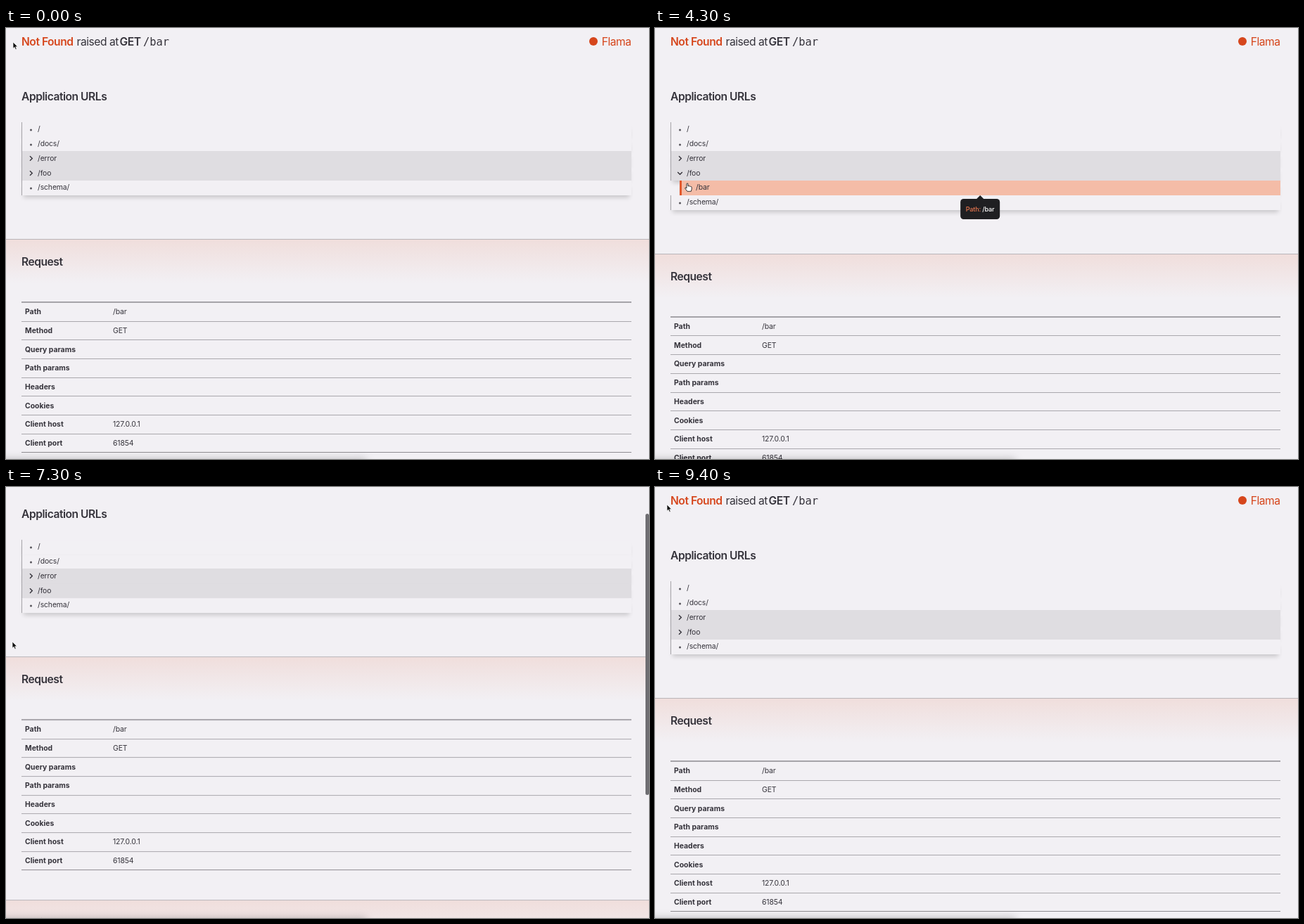
Write an HTML page that moves like this. It is 914 px wide and 613 px high and loops after 9500 ms.

```html
<!DOCTYPE html>
<html lang="en">
<head>
<meta charset="utf-8">
<title>Not Found</title>
<style>
  html, body { margin: 0; width: 100%; height: 100%; overflow: hidden; background: #f2f0f4; }
  body { position: relative; color: #35333b; font: 10.4px Inter, sans-serif; letter-spacing: -.01em; }
  #page { position: absolute; left: 0; top: 0; width: 914px; height: 944px; }
  header { position: relative; height: 133.8px; }
  header span, h2 { position: absolute; margin: 0; font-size: 15.6px; line-height: 20px; letter-spacing: -.03em; white-space: pre; }
  header span { top: 9.5px; }
  h2 { left: 22px; font-weight: 600; }
  header .strong { font-weight: 600; }
  .accent { color: #d6461c; }
  header .mono { font-family: "DejaVu Sans Mono", monospace; font-size: 15.4px; letter-spacing: 0; }
  .logo { position: absolute; left: 829px; top: 13px; width: 12px; height: 12px; border-radius: 50%; background: #d6461c; }

  #tree { margin: 0 25px 62.2px 22px; --drop: 0 6px 6px -3px rgba(0, 0, 0, .18); }
  .row { position: relative; height: 20.8px; box-sizing: border-box; border-left: 1px solid #a5a3a8;
    background: #f2f0f4; box-shadow: var(--drop); }
  .row span { position: absolute; left: 22px; top: .5px; line-height: 20.8px; }
  .row svg { position: absolute; left: 8px; top: 6px; width: 9px; height: 9px; }
  .row.branch { background: #dfdde1; }
  .row.open svg { transform: rotate(90deg); }
  .row.hover { background: #f4bca7; box-shadow: inset 2px 0 #e2582c, var(--drop); border-left-color: #e2582c; }

  section { position: relative; border-top: 1px solid #b9b5b9; padding-top: 89px; margin-bottom: 42px;
    background: linear-gradient(#f0dedc, #f2f0f4 62px); }
  section h2 { top: 22px; }
  .table { margin: 0 25px 0 22px; border-bottom: 1px solid #8f8d92; box-shadow: 0 -1px #a09ea3; }
  .line { display: flex; align-items: center; min-height: 26.7px; box-sizing: border-box; border-top: 1px solid #aaa8ad; }
  .line b { width: 130px; padding-left: 5px; box-sizing: border-box; letter-spacing: 0; }
  .line div { line-height: 15.6px; white-space: pre; }
  .line.tall { height: 105px; }

  #tip { position: absolute; padding: 8px 7.5px; border-radius: 4.5px; background: #1f1f22; color: #fff;
    font-size: 9.1px; font-weight: 500; line-height: 13px; letter-spacing: -.02em; white-space: pre; transform: translateX(-50%); }
  #tip::before { content: ""; position: absolute; left: 50%; top: -5px; margin-left: -5px;
    border: 5px solid transparent; border-top: 0; border-bottom-color: #1f1f22; }
  #tip i { font-style: normal; color: #e8764f; }

  #bar { position: absolute; right: 0; top: 0; width: 5px; height: 400px; border-radius: 3px; background: #6f6e72; }
  #shade { position: absolute; left: -40px; top: 616px; width: 550px; height: 40px; box-shadow: 0 0 12px 2px rgba(0, 0, 0, .28); }
  #cursor { position: absolute; left: 0; top: 0; width: 14px; height: 16px; overflow: visible; }
</style>
</head>
<body>
<div id="page">
  <header>
    <span class="accent strong" style="left:22px">Not Found</span>
    <span style="left:100.5px">raised at</span>
    <span class="strong" style="left:161.5px">GET</span>
    <span class="mono" style="left:195px">/bar</span>
    <div class="logo"></div>
    <span class="accent" style="right:25.5px">Flama</span>
    <h2 style="top:88px">Application URLs</h2>
  </header>
  <div id="tree"></div>
  <div id="tables"></div>
  <div id="tip"></div>
</div>
<div id="bar"></div>
<div id="shade"></div>
<svg id="cursor">
  <path id="arrow" d="M0 0V9.2L2.1 7.3L3.6 10.6L5.2 9.9L3.8 6.7H6.6Z" fill="#111" stroke="#fff" stroke-width=".7"/>
  <path id="hand" d="M0 .8Q1-.4 2 .8V4.2Q3.2 3.4 3.9 4.4Q5 3.7 5.7 4.8Q7.2 4.6 7.2 6V8.4L6.3 11.6H.9L-2.2 7.4Q-2.4 5.9-1 6.4L0 7.3Z" fill="#fff" stroke="#222" stroke-width=".9"/>
</svg>
<script>
const DURATION = 9500, STEP = 100, TREE_TOP = 133.8, ROW = 20.8, INDENT = 13;
const MAX_SCROLL = 331, GLIDE = 400;
const $ = id => document.getElementById(id);

const endpoint = (name, line, path) => ({
  Endpoint: name, File: 'examples/error.py', Line: line, Module: 'examples.error', Name: name, Path: path
});
const leaf = (label, under = [], info = { Path: label }) => ({ label, under, info });
const branch = (key, under) => ({ ...leaf('/' + key, under), key });
const rows = [
  leaf('/'),
  leaf('/docs/'),
  branch('error'),
  leaf('/500', ['error'], endpoint('error', 43, '/500')),
  branch('foo'),
  branch('bar', ['foo']),
  leaf('/barfoo/', ['foo', 'bar'], endpoint('barfoo', 53, '/barfoo/')),
  leaf('/foobar/', ['foo', 'bar'], endpoint('foobar', 58, '/foobar/')),
  leaf('/schema/')
];

const home = '/Users/damian-desk', lib = home + '/.pyenv/versions/3.10.4/lib/python3';
const tables = {
  Request: {
    Path: '/bar', Method: 'GET', 'Query params': '', 'Path params': '', Headers: '', Cookies: '',
    'Client host': '127.0.0.1', 'Client port': '61854'
  },
  Environment: {
    'Python version': '3.10.4 (main, Sep 21 2022, 18:58:02) [Clang 13.1.6 (clang-1316.0.21.2.5)]',
    Python: home + '/Dev/vortice/.venv/bin/python',
    Platform: 'darwin',
    Path: [home + '/Dev/vortice/flama', home + '/Dev/vortice/.venv/bin', lib + '10.zip', lib + '.10',
      lib + '.10/lib-dynload', home + '/Dev/vortice/.venv/lib/python3.10/site-packages'].join('\n')
  }
};

// Pointer stops, each reached by an eased glide
const stop = (time, x, y) => ({ time, x, y });
const stops = [
  stop(0, 10, 20), stop(900, 34, 181), stop(2400, 58, 205), stop(3000, 34, 184.5), stop(3600, 34, 203),
  stop(4400, 47, 224), stop(5300, 72, 260), stop(6100, 47, 224), stop(6500, 34, 204),
  stop(7000, 9, 220), stop(9000, 20, 45), stop(9400, 17, 25)
];
const opened = { error: [1900, 3200], foo: [3900, 6600], bar: [4700, 6300] };

function ramp(t, from, to) {
  const p = Math.min(1, Math.max(0, (t - from) / (to - from)));
  return p * p * (3 - 2 * p);
}
const pulse = (t, a, b, c, d) => ramp(t, a, b) - ramp(t, c, d);
const isOpen = (key, t) => t >= opened[key][0] && t < opened[key][1];

function pointerAt(t) {
  let { x, y } = stops[0];
  for (const s of stops.slice(1)) {
    const p = ramp(t, s.time - GLIDE, s.time);
    x += (s.x - x) * p;
    y += (s.y - y) * p;
  }
  return { x, y };
}

const scrollAt = t => 4 * pulse(t, 1100, 1300, 1600, 1800) + MAX_SCROLL * pulse(t, 7050, 7980, 8200, 8900);
const barAlphaAt = t => pulse(t, 1100, 1200, 2100, 2400) + pulse(t, 7100, 7200, 9000, 9300);

for (const row of rows) {
  row.depth = row.under.length;
  const icon = row.key
    ? '<path d="M3 1.2L6.3 4.5L3 7.8" fill="none" stroke="#35333b" stroke-width="1.4"/>'
    : '<circle cx="4.5" cy="5" r="1.5" fill="#55535a"/>';
  row.el = document.createElement('div');
  row.el.className = row.key ? 'row branch' : 'row';
  row.el.style.marginLeft = row.depth * INDENT + 'px';
  row.el.innerHTML = `<svg>${icon}</svg><span>${row.label}</span>`;
  $('tree').append(row.el);
}

const line = ([name, value]) =>
  `<div class="line${value.includes('\n') ? ' tall' : ''}"><b>${name}</b><div>${value}</div></div>`;
$('tables').innerHTML = Object.entries(tables).map(([title, data]) =>
  `<section><h2>${title}</h2><div class="table">${Object.entries(data).map(line).join('')}</div></section>`).join('');

let shownTip = null;
function showTip(row, index) {
  $('tip').style.display = row ? '' : 'none';
  if (!row) return;
  if (row !== shownTip) {
    $('tip').innerHTML = Object.entries(row.info).map(([k, v]) => `<i>${k}:</i> ${v}`).join('\n');
    shownTip = row;
  }
  $('tip').style.left = 455.5 + row.depth * INDENT / 2 + 'px';
  $('tip').style.top = TREE_TOP + (index + 1) * ROW + 5 + 'px';
}

function render(t) {
  const { x, y } = pointerAt(t), scroll = scrollAt(t);
  const visible = rows.filter(r => r.under.every(key => isOpen(key, t)));
  const index = Math.floor((y + scroll - TREE_TOP) / ROW);
  const target = visible[index];
  const hovered = target && x > 22 + target.depth * INDENT ? target : null;

  for (const r of rows) {
    r.el.style.display = visible.includes(r) ? '' : 'none';
    r.el.classList.toggle('open', !!r.key && isOpen(r.key, t));
    r.el.classList.toggle('hover', r === hovered);
  }
  showTip(hovered, index);
  $('page').style.transform = `translateY(${-scroll}px)`;
  $('bar').style.transform = `translateY(${scroll / MAX_SCROLL * 213}px)`;
  $('bar').style.opacity = barAlphaAt(t);
  $('cursor').style.transform = `translate(${x}px, ${y}px)`;
  $('arrow').style.display = hovered ? 'none' : '';
  $('hand').style.display = hovered ? '' : 'none';
}

const start = performance.now();
function tick() {
  const t = (performance.now() - start) % DURATION;
  render(Math.floor(t / STEP) * STEP);
  requestAnimationFrame(tick);
}
tick();
</script>
</body>
</html>
```
